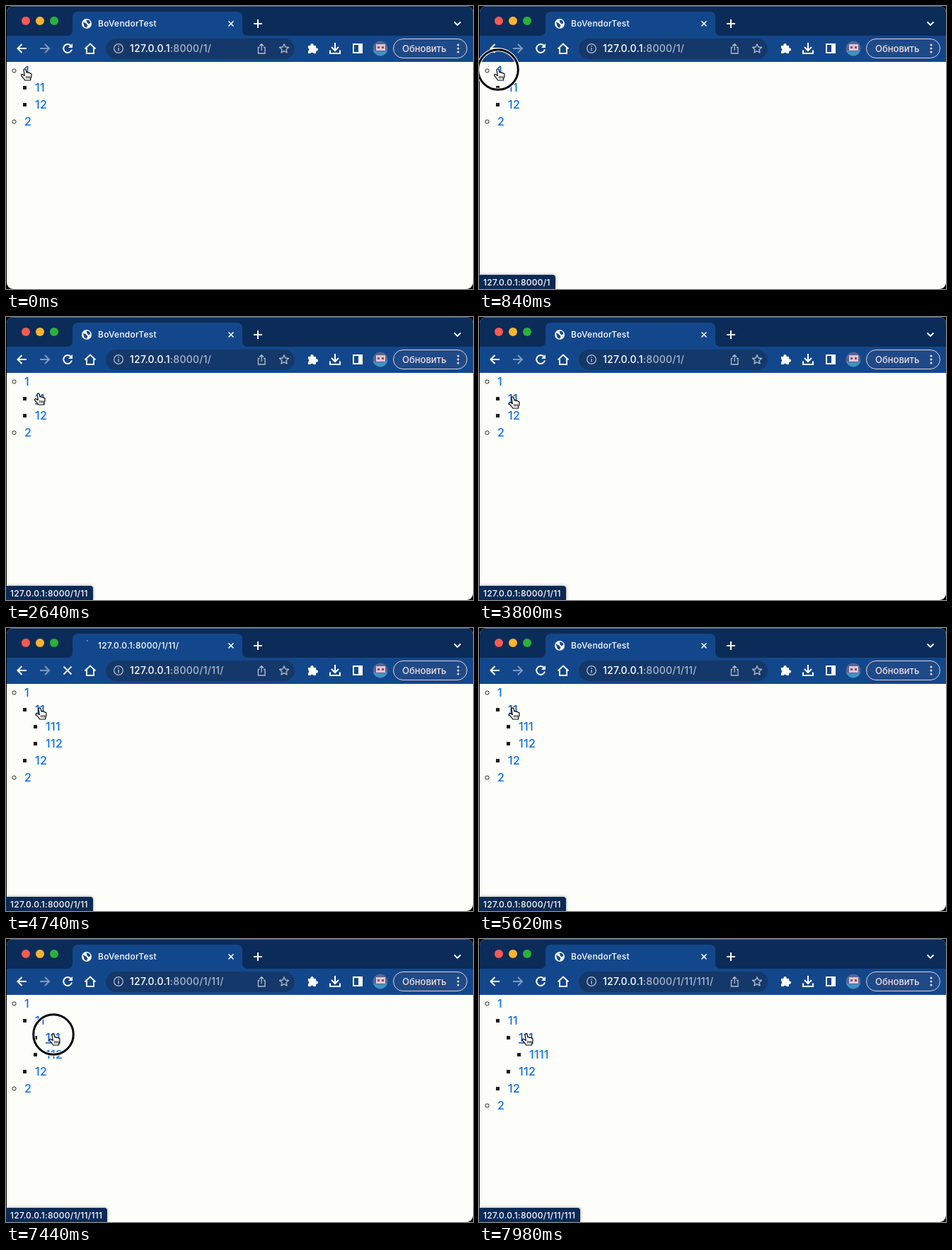
Animation, 660 px wide and 400 px high, one loop 8 s. Source, as an HTML page:

```html
<!DOCTYPE html>
<html lang="ru">
<head>
<meta charset="utf-8">
<title>Menu demo</title>
<style>
html, body { margin: 0; width: 100%; height: 100%; overflow: hidden; background: #000; }
#stage { position: relative; width: 660px; height: 400px; overflow: hidden; background: #000; font-family: Inter, "Open Sans", sans-serif; font-weight: 500; letter-spacing: .25px; }
#window { position: absolute; left: 1px; top: 0; width: 659px; height: 400px; border-radius: 9px; overflow: hidden; background: #fdfdf9; }
svg { position: absolute; left: 0; top: 0; }
.line { fill: none; stroke: #fff; stroke-width: 2; }
.thin { fill: none; stroke: #b3bfcd; stroke-width: 1.3; }
#status { position: absolute; left: 0; top: 380px; box-sizing: border-box; height: 20px; padding: 0 7px 0 6px; border-radius: 0 4px 0 0; background: #0b2a55; color: #fff; font-size: 12px; line-height: 21px; white-space: pre; box-shadow: 0 0 4px #999; }
#list { font-size: 16px; letter-spacing: .3px; }
#list a { fill: #0d6ee6; }
#list a.hover { fill: #0a58ca; text-decoration: underline; }
</style>
</head>
<body>
<div id="stage">
  <div id="window"></div>
  <svg width="660" height="400" viewBox="0 0 660 400">
    <clipPath id="frame"><rect x="1" y="0" width="659" height="400" rx="9"/></clipPath>
    <g clip-path="url(#frame)">
      <path fill="#0b2c59" d="M0 0H660V42H0Z"/>
      <path fill="none" stroke="#4d6a8c" d="M6 .5H654"/>
      <path fill="#13478b" d="M0 42H86Q94 42 94 34V16Q94 8 102 8H326Q334 8 334 16V34Q334 42 342 42H660V79H0Z"/>
    </g>

    <circle cx="28" cy="21" r="6" fill="#fb5a50"/>
    <circle cx="48" cy="21" r="6" fill="#fdb42c"/>
    <circle cx="68" cy="21" r="6" fill="#2bb03c"/>

    <g id="globe">
      <circle cx="114" cy="25" r="7" fill="#f6f8fa"/>
      <path fill="#13478b" d="M109 22.5L113 24.5 115.5 27.5 113.5 31 110.5 28.5ZM113.5 19.5L118 20.5 119.3 24 116.5 25.5 114.5 23Z"/>
    </g>
    <circle id="spinner" cx="114" cy="25" r="7" fill="none" stroke="#b3bfcd" stroke-width="1.6"/>
    <text id="title" x="130" y="29" font-size="12" fill="#fff"></text>
    <path class="line" style="stroke-width:1.6" d="M314.5 21.5L321.5 28.5M321.5 21.5L314.5 28.5"/>
    <path class="line" d="M350 25H362M356 19V31"/>
    <path class="line" style="stroke-width:1.8" d="M633.5 22.5L638 27 642.5 22.5"/>

    <path class="line" d="M29 60H17M22.5 54L16.5 60 22.5 66"/>
    <path class="line" style="stroke:#7f9abd" d="M48 60H60.5M55 54L61 60 55 66"/>
    <g id="reload">
      <path class="line" d="M91.7 56A6 6 0 1 0 93 61.5"/>
      <path fill="#fff" d="M94 53V59H88Z"/>
    </g>
    <path id="stop" class="line" style="stroke-width:1.8" d="M81.5 54.5L92.5 65.5M92.5 54.5L81.5 65.5"/>
    <path class="line" style="stroke-width:1.8" d="M111.5 60.5L119 53.5 126.5 60.5M114 59V67H124V59"/>

    <rect x="141" y="46" width="267" height="29" rx="14.5" fill="#15386a"/>
    <circle class="thin" cx="159" cy="60" r="6.3"/>
    <path class="thin" style="stroke-width:1.5" d="M159 59V63.5M159 56V57.5"/>
    <text y="65" x="175" font-size="14" fill="#fff">127.0.0.1<tspan id="path" fill="#a9b7c9"></tspan></text>
    <path class="thin" d="M358.5 58.5H356.5V67H366V58.5H364M361.2 63V54M358.3 56.5L361.2 53.6 364.1 56.5"/>
    <path class="thin" stroke-linejoin="round" d="M393 53.8L394.9 58 399.5 58.5 396 61.5 397 66 393 63.6 389 66 390 61.5 386.5 58.5 391.1 58Z"/>

    <path fill="#fff" d="M427 56H430.5A2.2 2.2 0 1 1 434.5 56H438V59.5A2.2 2.2 0 1 1 438 63.5V67H434.5A2.2 2.2 0 0 0 430.5 67H427V63.5A2.2 2.2 0 0 0 427 59.5Z"/>
    <path class="line" d="M465 52V62.5M460 58L465 63 470 58M458 62.5V67H472V62.5"/>
    <rect class="line" x="491" y="54" width="12" height="12"/>
    <path fill="#fff" d="M498 53H504V67H498Z"/>

    <circle cx="529" cy="60" r="10.5" fill="#55668f"/>
    <path fill="#e3c3d2" d="M523 54H536V63H523Z"/>
    <path fill="#83506f" d="M525 57H528V60H525ZM531 57H534V60H531Z"/>
    <path fill="#3f93c4" d="M518.7 62L524 64 534 64 539.3 62A10.5 10.5 0 0 1 518.7 62Z"/>

    <rect x="547.5" y="46.5" width="104" height="27" rx="13.5" fill="#1f4a88" stroke="#e6d3d2"/>
    <text x="560" y="65" font-size="13" letter-spacing="0" fill="#f4dedb">Обновить</text>
    <g fill="#f4dedb"><circle cx="639" cy="55" r="1.5"/><circle cx="639" cy="60" r="1.5"/><circle cx="639" cy="65" r="1.5"/></g>

    <g id="list"></g>
  </svg>
  <div id="status"></div>
  <svg width="660" height="400" viewBox="0 0 660 400">
    <g id="pointer">
      <g id="ring" fill="none">
        <circle cy="1" r="28.3" stroke="#fff" stroke-width="5"/>
        <circle cy="1" r="28.3" stroke="#000" stroke-width="3"/>
      </g>
      <path id="arrow" fill="#000" stroke="#fff" d="M0 0V14.5L3.4 11.3 5.8 16.6 8 15.6 5.7 10.4H10.3Z"/>
      <g id="hand" stroke="#000" stroke-linejoin="round">
        <path fill="#fff" stroke-width="1.2" d="M-2 1.5C-2-.5 .6-.6 1 1L2 5C2.5 4.2 4.2 4.4 4.6 5.6 5.4 4.9 6.8 5.2 7.1 6.4 8 6 9 6.6 9 7.8 9.3 10 8.5 12 7.8 13.5L7.5 16H-.3C-1 14-3.5 12-5 10-6.2 8-5 6.8-3.6 7.7L-.7 9.5Z"/>
        <path fill="none" d="M1.8 10V13.5M4 10V13.5M6.2 10V13.5"/>
      </g>
    </g>
  </svg>
</div>
<script>
const LOOP = 8000, SITE = 'BoVendorTest', HOST = '127.0.0.1';
const $ = id => document.getElementById(id);

const pages = [
  { at: 0, path: ':8000/1/', rows: ['1', '11', '12', '2'] },
  { at: 4700, path: ':8000/1/11/', rows: ['1', '11', '111', '112', '12', '2'] },
  { at: 7620, path: ':8000/1/11/111/', rows: ['1', '11', '111', '1111', '112', '12', '2'] }
];
const statuses = [
  { at: 0, text: '' },
  { at: 400, text: ':8000/1' },
  { at: 2320, text: ':8000/1/11' },
  { at: 6180, text: '' },
  { at: 6480, text: ':8000/1/11/111' }
];
const presses = [[800, 920], [4480, 4620], [7420, 7540]];
const loads = [[1020, 1320], [4700, 5020], [7620, 7920]];
const route = [
  [0, 27, 89], [1800, 27, 89], [1980, 34.5, 94], [2400, 46, 108], [2640, 46, 108],
  [2900, 48, 113], [5800, 48, 113], [6050, 61, 126], [6300, 62, 128], [6540, 67, 134], [LOOP, 67, 134]
];

const latest = (steps, t) => steps.filter(s => s.at <= t).pop();
const within = (spans, t) => spans.find(([a, b]) => t >= a && t < b);
const show = (id, on) => { $(id).style.display = on ? '' : 'none'; };
const setText = (id, text) => { if ($(id).textContent !== text) $(id).textContent = text; };

function cursorAt(t) {
  const i = route.findIndex(p => p[0] > t);
  const [t0, x0, y0] = route[i - 1], [t1, x1, y1] = route[i];
  const k = (t - t0) / (t1 - t0);
  return [x0 + (x1 - x0) * k, y0 + (y1 - y0) * k];
}

const rowX = label => 26 + 15 * (label.length - 1);

function rowMarkup(label, i, hovered) {
  const x = rowX(label), y = 91.5 + 24 * i;
  const bullet = label.length === 1
    ? `<circle cx="11.5" cy="${y}" r="2.6" fill="none" stroke="#222"/>`
    : `<rect x="${x - 17}" y="${y - 2.5}" width="5" height="5" fill="#1a1a1a"/>`;
  return `${bullet}<a class="${hovered ? 'hover' : ''}"><text x="${x}" y="${y + 5.5}">${label}</text></a>`;
}

let drawn = '';
function render(t) {
  const page = latest(pages, t), status = latest(statuses, t).text;
  const load = within(loads, t), [x, y] = cursorAt(t);
  const hover = page.rows.findIndex((label, i) =>
    Math.abs(y - 91.5 - 24 * i) < 10 && x >= rowX(label) && x <= rowX(label) + 7.2 * label.length);

  const key = page.path + hover;
  if (key !== drawn) {
    $('list').innerHTML = page.rows.map((label, i) => rowMarkup(label, i, i === hover)).join('');
    drawn = key;
  }

  setText('title', load ? HOST + page.path : SITE);
  setText('path', page.path);
  setText('status', HOST + status);
  show('status', status);
  show('globe', !load);
  show('reload', !load);
  show('stop', load);
  show('spinner', load);
  if (load) {
    const age = t - load[0];
    $('spinner').setAttribute('stroke-dasharray', `${age / 30} 44`);
    $('spinner').setAttribute('transform', `rotate(${age * 0.4 - 106} 114 25)`);
  }

  $('pointer').setAttribute('transform', `translate(${x} ${y})`);
  show('hand', hover >= 0);
  show('arrow', hover < 0);
  show('ring', within(presses, t));
}

const start = performance.now();
function tick() {
  render((performance.now() - start) % LOOP);
  requestAnimationFrame(tick);
}
tick();
</script>
</body>
</html>
```
